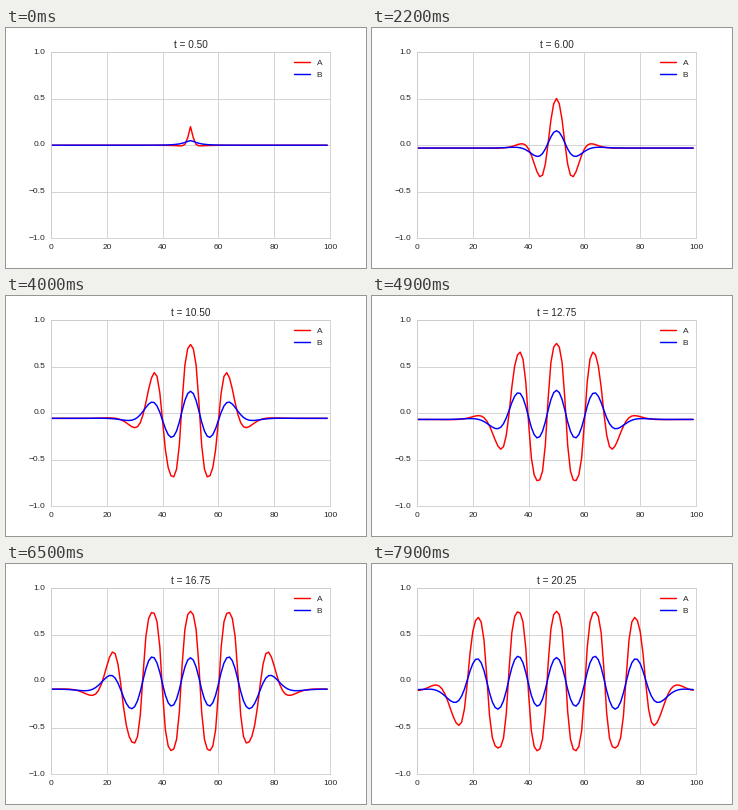
A matplotlib script for the animation above (8000 ms loop, 360 by 240 pixels).

```python
import matplotlib.pyplot as plt
import numpy as np
from matplotlib.animation import FuncAnimation

# One-dimensional FitzHugh-Nagumo reaction-diffusion on a ring
DA, DB, ALPHA, BETA = 1, 100, -0.005, 10
WIDTH, DT = 100, 0.001
FRAMES, INTERVAL = 80, 100
STEPS = 250  # solver steps per frame

plt.rcParams.update({
    "font.family": "Liberation Sans",
    "font.size": 10,
    "text.color": "0.15",
    "text.kerning_factor": 6,
    "axes.edgecolor": "0.8",
    "axes.linewidth": 1,
    "axes.axisbelow": True,
    "axes.grid": True,
    "axes.titlesize": 12,
    "axes.titlepad": 5,
    "grid.color": "0.8",
    "grid.linewidth": 1,
    "lines.linewidth": 1.75,
    "lines.solid_capstyle": "round",
    "xtick.color": "0.15",
    "ytick.color": "0.15",
    "xtick.major.size": 0,
    "ytick.major.size": 0,
    "xtick.major.pad": 7,
    "ytick.major.pad": 7,
    "ytick.alignment": "center",
    "legend.frameon": False,
    "legend.fontsize": 10,
})


def laplacian(u):
    return np.roll(u, 1) + np.roll(u, -1) - 2 * u


def advance(a, b, steps):
    for _ in range(steps):
        da = DA * laplacian(a) + a - a**3 - b + ALPHA
        db = DB * laplacian(b) + BETA * (a - b)
        a, b = a + DT * da, b + DT * db
    return a, b


def simulate():
    a, b = np.zeros(WIDTH), np.zeros(WIDTH)
    a[WIDTH // 2] = 0.3
    a, b = advance(a, b, STEPS)
    states = []
    for _ in range(FRAMES):
        a, b = advance(a, b, STEPS)
        states.append((a, b))
    return states


states = simulate()

fig = plt.figure(figsize=(6, 4), dpi=60, facecolor="white")
ax = fig.add_axes([0.125, 0.125, 0.775, 0.775])
x = np.arange(WIDTH)
line_a, = ax.plot(x, states[0][0], color="#ff0000", label="A")
line_b, = ax.plot(x, states[0][1], color="#0000ff", label="B")
ax.set(xlim=(0, 100), ylim=(-1, 1),
       xticks=range(0, 101, 20), yticks=np.linspace(-1, 1, 5))
ax.legend(loc="upper right")
title = ax.set_title("", y=1)


def draw(i):
    a, b = states[i]
    line_a.set_ydata(a)
    line_b.set_ydata(b)
    title.set_text(f"t = {(i + 2) * STEPS * DT:.2f}")
    return line_a, line_b, title


anim = FuncAnimation(fig, draw, frames=FRAMES, interval=INTERVAL,
                     repeat=True, repeat_delay=0)
plt.show()
```
